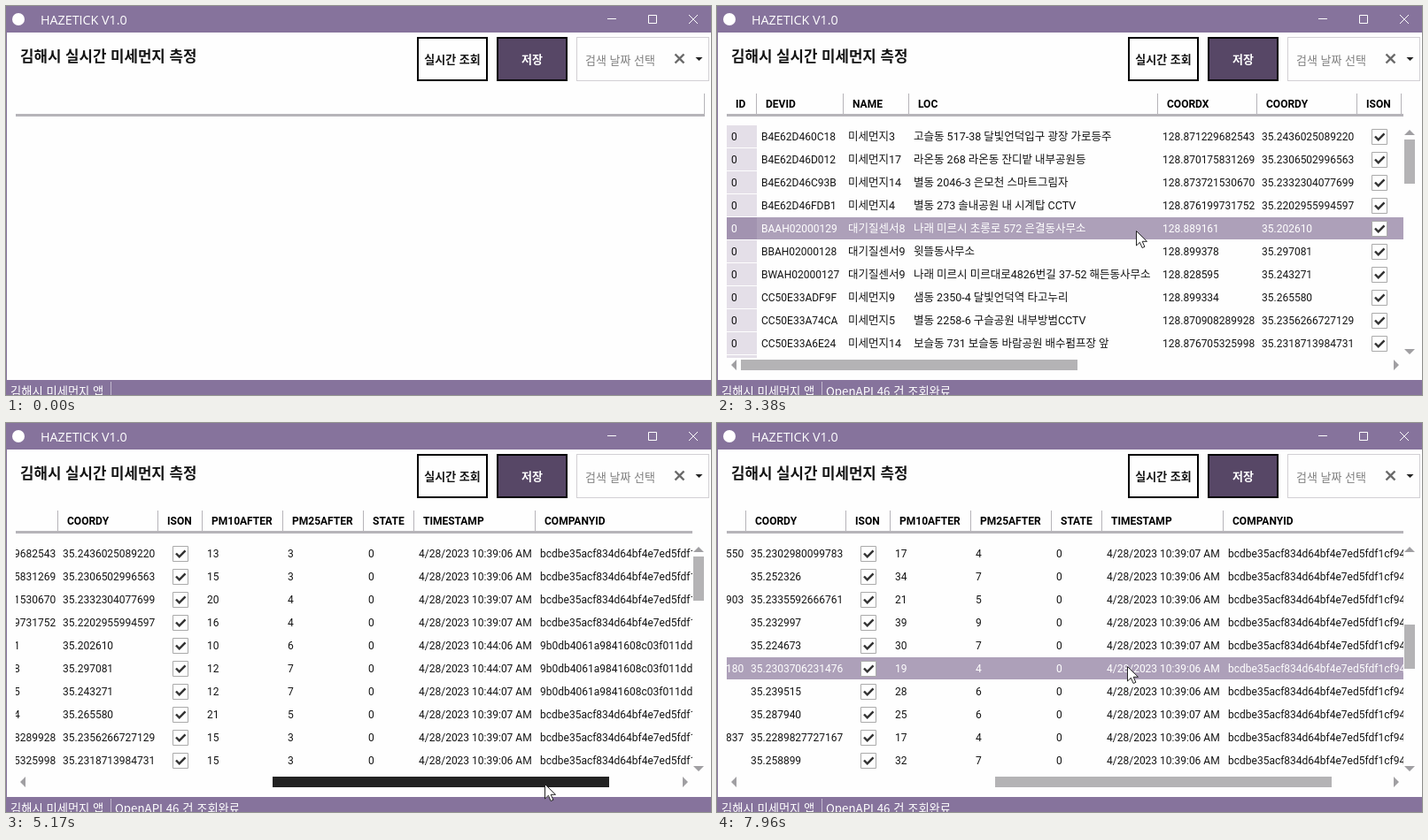
Write an HTML page that moves like this. It is 796 px wide and 440 px high and loops after 8 s.

```html
<!DOCTYPE html>
<html lang="ko">
<head>
<meta charset="utf-8">
<title>HAZETICK</title>
<style>
html, body { margin: 0; width: 100%; height: 100%; overflow: hidden; }
body { font: 13px/26px "Noto Sans CJK KR", "Noto Sans CJK", sans-serif; color: #141414; white-space: nowrap; }
div, svg { position: absolute; left: 0; top: 0; box-sizing: border-box; }
#stage { width: 796px; height: 440px; overflow: hidden; background: #fefefe; --bar: #86739c; --line: #b6b4b9; }
.bar { width: 796px; background: var(--bar); color: #fff; }
#edge { width: 1px; height: 440px; background: var(--bar); }
#app { left: 39px; font: 14.3px/31px "Open Sans", "Noto Sans", sans-serif; }
#mark { left: 7px; top: 8px; width: 14px; height: 14px; border-radius: 50%; background: #fff; }
#heading { left: 16px; top: 43px; font-size: 16.8px; font-weight: 700; }
.button { top: 35px; width: 80px; height: 50px; border: 2px solid #000; text-align: center; line-height: 46px; font-weight: 700; }
#query { left: 464px; }
#query.over { background: #dcdcdc; }
#save { left: 554px; background: #574766; color: #fff; }
#save.over { background: #848284; }
#date { left: 644px; top: 35px; width: 150px; height: 50px; border: 1px solid #d2d0d4; padding-left: 9px; line-height: 49px; color: #808080; }
.status { font-size: 13.3px; }
#headLine { left: 11px; top: 122px; height: 3px; background: var(--line); }
#headEnd { left: 788px; top: 99px; width: 1px; height: 24px; background: var(--line); }
#headClip, #bodyClip { left: 11px; width: 764px; overflow: hidden; }
#headClip { top: 99px; height: 23px; }
#bodyClip { top: 135px; height: 263px; }
#head, #rows { left: -11px; width: 1500px; }
.title { height: 23px; font: 600 12px/25px Roboto, "Noto Sans CJK KR", sans-serif; color: #000; }
.sep { width: 1px; height: 23px; background: var(--line); }
.row { width: 1500px; height: 25px; font: 12px/26px Roboto, "Noto Sans CJK KR", sans-serif; }
.row.over { background: #ada0b9; color: #fff; }
.ko { font-size: 12.5px; }
.id { left: 11px; width: 34px; height: 25px; padding-left: 5px; background: #e4dfe8; }
.over .id { background: #a293b0; }
.check { left: 739px; top: 4px; }
.thumb { background: #b4b3b5; }
#hThumb { left: 27px; top: 400px; width: 380px; height: 12px; }
#hThumb.drag { background: #222; }
#vThumb { left: 776px; top: 151px; width: 12px; height: 50px; }
.loaded { visibility: hidden; }
</style>
</head>
<body>
<div id="stage">
  <div id="heading">김해시 실시간 미세먼지 측정</div>
  <div id="query" class="button">실시간 조회</div>
  <div id="save" class="button">저장</div>
  <div id="date">검색 날짜 선택</div>
  <div id="headLine"></div>
  <div id="headEnd"></div>
  <div id="grid" class="loaded">
    <div id="headClip"><div id="head"></div></div>
    <div id="bodyClip"><div id="rows"></div></div>
    <div id="hThumb" class="thumb"></div>
    <div id="vThumb" class="thumb"></div>
    <svg width="796" height="440" fill="#a09fa2">
      <path d="M776 146h12l-6-6zM776 388h12l-6 6zM22 400v12l-6-6zM764 400v12l6-6z"/>
    </svg>
  </div>
  <div class="bar" style="height:30px"><div id="mark"></div><div id="app">HAZETICK V1.0</div></div>
  <div class="bar" style="top:423px;height:17px;overflow:hidden">
    <div class="status" style="left:5px">김해시 미세먼지 앱</div>
    <div style="left:118px;top:2px;width:1px;height:15px;background:#c3b9ce"></div>
    <div id="result" class="status loaded" style="left:123px">OpenAPI 46 건 조회완료</div>
  </div>
  <div id="edge"></div>
  <svg width="796" height="440" fill="none">
    <path d="M679 14.5h10M725.5 10.5h9v9h-9zM771 10l10 10M781 10l-10 10" stroke="#fff"/>
    <path d="M755.5 54.5l10 10M765.5 54.5l-10 10" stroke="#6a6a6a" stroke-width="2.4"/>
    <path d="M778.5 58h8l-4 4z" fill="#222"/>
  </svg>
  <svg id="cursor" width="16" height="24">
    <path d="M.5.5v16.5l3.9-3.7 2.7 6.2 2.8-1.2-2.7-6h5.3z" fill="#fff" stroke="#222"/>
  </svg>
</div>
<script>
const $ = id => document.getElementById(id);
const LOOP = 8000, LOAD = 2700, ROW = 26, ROW_COUNT = 27;
const DRAG_FROM = 4380, DRAG_TO = 5285, GRAB_X = 334, DROP_X = 621, DRAG_RATIO = 2.01;
const WHEEL_FROM = 6750, WHEEL_STEP = 250, WHEEL_ROWS = 3;

const columns = {
  ID: 10, DEVID: 44, NAME: 142, LOC: 216, COORDX: 497, COORDY: 609, ISON: 722,
  PM10AFTER: 772, PM25AFTER: 863, STATE: 954, TIMESTAMP: 1011, COMPANYID: 1148
};
const places = [
  '고슬동 517-38 달빛언덕입구 광장 가로등주', '라온동 268 라온동 잔디밭 내부공원등',
  '별동 2046-3 은모천 스마트그림자', '별동 273 솔내공원 내 시계탑 CCTV',
  '나래 미르시 초롱로 572 은결동사무소', '윗뜰동사무소',
  '나래 미르시 미르대로4826번길 37-52 해든동사무소', '샘동 2350-4 달빛언덕역 타고누리',
  '별동 2258-6 구슬공원 내부방범CCTV', '보슬동 731 보슬동 바람공원 배수펌프장 앞'
];
const checkBox = `<svg class="check" width="18" height="18" fill="none">
  <path d="M.5.5h17v17h-17z" fill="#fefefe" stroke="#aaa"/>
  <path d="M4 8.5l3.7 3.8 6.8-7" stroke="#333" stroke-width="2.5"/></svg>`;

let seed = 46;
const random = () => (seed = seed * 16807 % 2147483647) / 2147483647;
const between = (low, high) => Math.floor(low + random() * (high - low + 1));
const digits = n => Array.from({ length: n }, () => between(0, 9)).join('');
const hex = n => Array.from({ length: n }, () => between(0, 15).toString(16)).join('');

function makeReading(i) {
  const sensor = i >= 4 && i <= 6;
  const short = sensor || i === 7 || (i > 15 && i % 3 < 2);
  const pm10 = sensor ? between(8, 15) : between(13, i > 15 && short ? 40 : 21);
  return {
    ID: 0,
    DEVID: sensor ? `B${'ABW'[i - 4]}AH0200012${9 - i + 4}` : (i < 4 ? 'B4E62D46' : 'CC50E33A') + hex(4).toUpperCase(),
    NAME: sensor ? '대기질센서' + between(5, 9) : '미세먼지' + between(2, 19),
    LOC: places[i] || '',
    COORDX: '128.8' + (short ? digits(5) : '7' + digits(10)),
    COORDY: '35.2' + (short ? digits(5) : between(2, 4) + digits(11)),
    PM10AFTER: pm10,
    PM25AFTER: Math.round(pm10 * (sensor ? 0.6 : 0.22)),
    STATE: 0,
    TIMESTAMP: `4/28/2023 10:${sensor ? 44 : 39}:0${between(6, 7)} AM`,
    COMPANYID: sensor ? '9b0db4061a9841608c03f011dd7dba52' : 'bcdbe35acf834d64bf4e7ed5fdf1cf94'
  };
}

function cell(name, value) {
  if (name === 'ID') return `<div class="id">${value}</div>`;
  if (name === 'ISON') return checkBox;
  const style = name === 'NAME' || name === 'LOC' ? 'ko' : '';
  return `<div class="${style}" style="left:${columns[name] + 6}px">${value}</div>`;
}

const names = Object.keys(columns);
$('head').innerHTML = names.map(name =>
  (name === 'ID' ? '' : `<div class="sep" style="left:${columns[name]}px"></div>`) +
  `<div class="title" style="left:${columns[name] + 11}px">${name}</div>`).join('');

$('rows').innerHTML = Array.from({ length: ROW_COUNT }, (_, i) => {
  const reading = makeReading(i);
  return `<div class="row" style="top:${i * ROW}px">${names.map(name => cell(name, reading[name])).join('')}</div>`;
}).join('');
const rows = [...document.querySelectorAll('.row')];

// time, x, y of the pointer tip
const path = [
  [1000, 720, 445], [1900, 600, 58], [2050, 600, 58], [2400, 508, 62], [2600, 508, 62],
  [3300, 473, 254], [3400, 473, 254], [3880, 340, 396], [4040, 340, 396], [4300, GRAB_X, 408],
  [DRAG_FROM, GRAB_X, 408], [DRAG_TO, DROP_X, 408], [5740, 478, 138], [5800, 478, 138],
  [6500, 465, 253], [6880, 465, 253], [7900, 463, 275], [LOOP, 463, 275]
];

function pointerAt(t) {
  const next = Math.max(1, path.findIndex(p => p[0] > t));
  const [t0, x0, y0] = path[next - 1], [t1, x1, y1] = path[next];
  const u = Math.max(0, (t - t0) / (t1 - t0)), ease = u * u * (3 - 2 * u);
  return [x0 + (x1 - x0) * ease, y0 + (y1 - y0) * ease].map(Math.round);
}

const show = (id, visible) => { $(id).style.visibility = visible ? 'visible' : 'hidden'; };
const move = (id, x, y) => { $(id).style.transform = `translate(${x}px,${y}px)`; };

function draw(t) {
  const [x, y] = pointerAt(t);
  const loaded = t >= LOAD;
  const dragging = t >= DRAG_FROM && t < DRAG_TO;
  const shift = t < DRAG_FROM ? 0 : (dragging ? x : DROP_X) - GRAB_X;
  const scroll = -Math.round(shift * DRAG_RATIO);
  const first = WHEEL_ROWS * Math.max(0, Math.floor((t - WHEEL_FROM) / WHEEL_STEP) + 1);

  move('cursor', x, y);
  show('cursor', t >= path[0][0]);
  for (const [id, left] of [['query', 464], ['save', 554]])
    $(id).classList.toggle('over', x >= left && x < left + 80 && y >= 35 && y < 85);

  show('grid', loaded);
  show('result', loaded);
  show('headEnd', !loaded);
  $('headLine').style.width = loaded ? '764px' : '778px';
  move('head', scroll, 0);
  move('rows', scroll, -first * ROW);
  move('hThumb', shift, 0);
  $('hThumb').classList.toggle('drag', dragging);
  move('vThumb', 0, Math.round(first * 5.1));

  const inside = !dragging && x >= 11 && x < 775 && y >= 135 && y < 398;
  const hovered = inside ? first + Math.floor((y - 135) / ROW) : -1;
  rows.forEach((row, i) => row.classList.toggle('over', i === hovered));
}

const begin = performance.now();
function tick() {
  draw((performance.now() - begin) % LOOP);
  requestAnimationFrame(tick);
}
tick();
</script>
</body>
</html>
```
